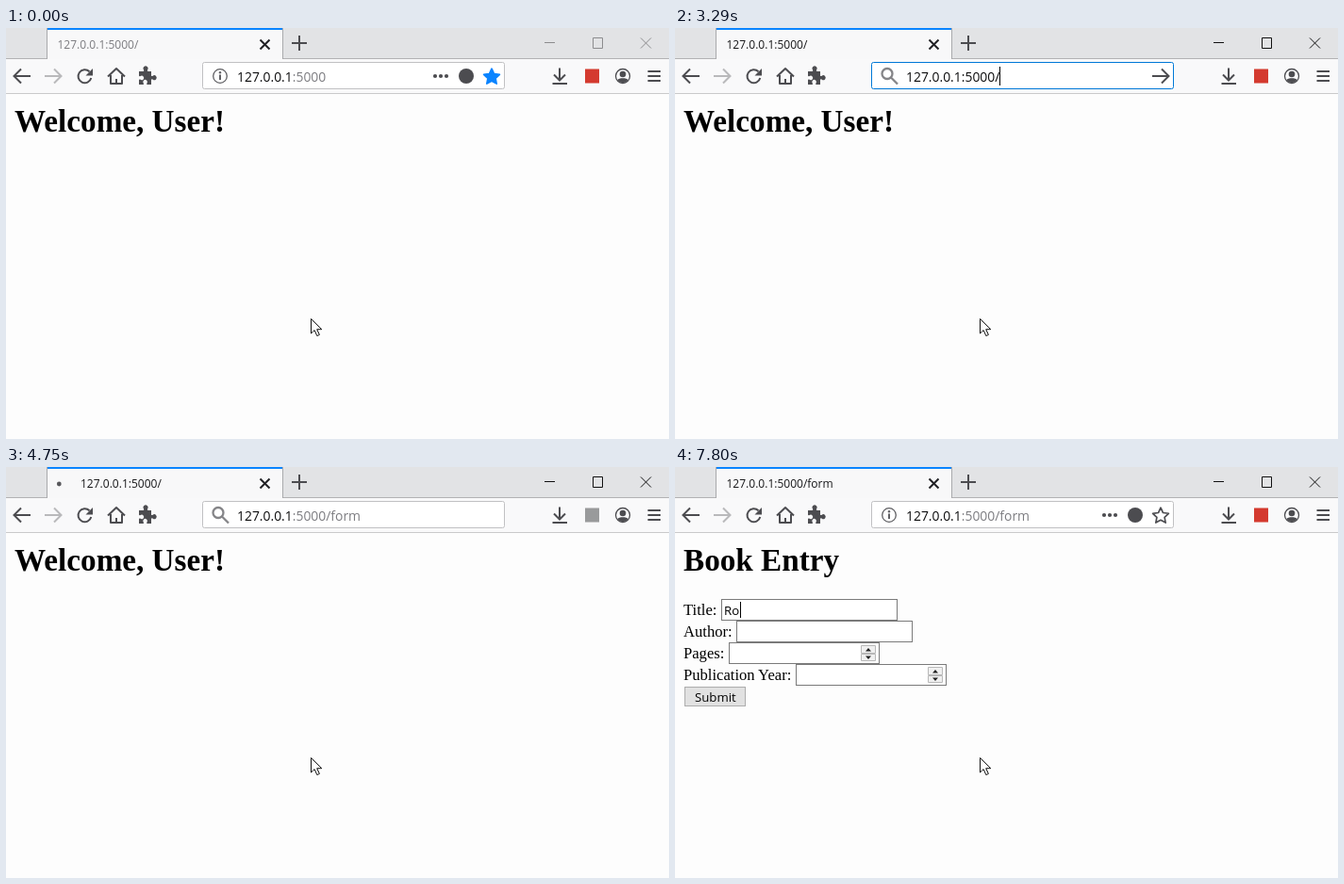
Write an HTML page that moves like this. It is 703x436 px and loops after 8 s.

```html
<!DOCTYPE html>
<html lang="en">
<head>
<meta charset="utf-8">
<title>Book Entry</title>
<style>
html, body { margin: 0; width: 100%; height: 100%; overflow: hidden; background: #fdfdfd; }
svg { display: block; width: 703px; height: 436px; }
text { font-family: "Open Sans", "Noto Sans", sans-serif; white-space: pre; }
.page text { font-family: "Liberation Serif", serif; font-size: 16.6px; }
.page text.head { font-size: 33.2px; font-weight: bold; }
.page text.ui { font-family: "Open Sans", "Noto Sans", sans-serif; font-size: 13.2px; }
.line { fill: none; stroke: #4c4c50; stroke-width: 2; }
.box { fill: #fff; stroke: #7a7a7a; }
.px { shape-rendering: crispEdges; }
</style>
</head>
<body>
<svg viewBox="0 0 703 436">
  <rect width="703" height="436" fill="#fdfdfd"/>

  <g class="page" id="welcome"><text class="head" x="9" y="110">Welcome, User!</text></g>

  <g class="page" id="form">
    <text class="head" x="9" y="110">Book Entry</text>
    <text x="9" y="157">Title:</text>
    <text x="9" y="180">Author:</text>
    <text x="9" y="203">Pages:</text>
    <text x="9" y="226">Publication Year:</text>
    <rect class="box" id="titleBox" x="49.5" y="140.5" width="186" height="22"/>
    <rect class="box" x="65.5" y="163.5" width="186" height="22"/>
    <rect class="box" x="57.5" y="186.5" width="159" height="22"/>
    <rect class="box" x="128.5" y="209.5" width="159" height="22"/>
    <g id="spin">
      <path d="M197.500 189.500h15v8h-15zM197.500 198.500h15v7h-15z" fill="#f0f0f0" stroke="#b8b8b8"/>
      <path d="M202 195.500l3-3.500 3 3.500zM202 200.500l3 3.500 3-3.500z" fill="#222"/>
    </g>
    <use href="#spin" x="71" y="23"/>
    <rect x="10.500" y="233.500" width="64" height="20" fill="#e1e1e1" stroke="#adadad"/>
    <text class="ui" x="21" y="249">Submit</text>
    <text class="ui" id="titleText" x="52" y="157"></text>
    <rect class="px" id="titleCaret" y="143" width="1" height="17"/>
  </g>

  <!-- tab strip -->
  <rect width="703" height="33" fill="#e2e3e5"/>
  <rect y="32" width="703" height="1" fill="#b2b2b4"/>
  <rect x="43" width="251" height="33" fill="#a9aaac"/>
  <rect x="44" y="0" width="249" height="33" fill="#f8f8f9"/>
  <rect x="44" y="0" width="249" height="2" fill="#0a84ff"/>
  <circle id="dot" cy="18" r="2.400" fill="#58585c"/>
  <text id="tabText" y="22" font-size="12"></text>
  <path class="line" d="M269.500 12.500l10 10m0-10l-10 10" style="stroke:#222226"/>
  <path class="line" d="M303 16h16M311 8v16"/>
  <path id="win" class="line" style="stroke-width:1" d="M571 15.500h11M622.500 10.500h10v11h-10zM673 10.500l11 11m0-11l-11 11"/>

  <!-- toolbar -->
  <rect y="33" width="703" height="36" fill="#f9f9fa"/>
  <rect y="69" width="703" height="1" fill="#c9c9cb"/>
  <path class="line" id="back" d="M26 51H9M16 43.500L8.500 51l7.500 7.500"/>
  <path class="line" d="M41 51h17M51 43.500l7.500 7.500-7.500 7.500" style="stroke:#b9b9bb"/>
  <path class="line" d="M88.500 46.300A7 7 0 1 0 90.300 53"/>
  <path d="M92 43v7.500h-7.500z" fill="#4c4c50"/>
  <path class="line" d="M108 51.500l9-8.500 9 8.500M111 50v9h12v-9M117 59v-5" stroke-linejoin="round"/>
  <path d="M141 46h4.500c1 0 .8-1 .4-1.700a2.600 2.600 0 1 1 4.300 0c-.4.700-.6 1.700.4 1.700H154v4.200c0 1 1 1 1.700.5a2.500 2.500 0 1 1 0 4c-.7-.5-1.700-.5-1.700.5V60h-4c-1 0-.9-.9-.5-1.600a2.300 2.300 0 1 0-3.800 0c.4.700.5 1.600-.5 1.600H141v-4.800c0-1 1-.8 1.600-.4a2.300 2.300 0 1 0 0-3.800c-.6.400-1.600.6-1.600-.4z" fill="#4c4c50"/>

  <rect id="bar" x="208.500" y="36.500" width="320" height="28" rx="2" fill="#fff"/>
  <g id="info" fill="#606064">
    <circle cx="227" cy="51" r="7.300" fill="none" stroke="#606064" stroke-width="1.300"/>
    <rect x="226" y="49.500" width="2" height="5.500"/><circle cx="227" cy="47.300" r="1.200"/>
  </g>
  <path id="lens" class="line" style="stroke:#858588;stroke-width:2.300" d="M230.500 48.500a5.500 5.500 0 1 1-11 0a5.500 5.500 0 1 1 11 0M229 52.500l7 7"/>
  <rect id="select" class="px" x="245" y="41" width="94" height="20" fill="#0078d7"/>
  <text id="url" x="245" y="56.500" font-size="13.900"><tspan id="host">127.0.0.1</tspan><tspan id="path"></tspan></text>
  <rect id="caret" class="px" y="41" width="1" height="20"/>
  <path id="chevron" class="line" d="M427.500 48l6.300 6.300 6.300-6.300"/>
  <g id="actions">
    <g fill="#4c4c50">
      <circle cx="455" cy="51" r="2.100"/><circle cx="461" cy="51" r="2.100"/><circle cx="467" cy="51" r="2.100"/>
      <circle cx="488" cy="51" r="8"/>
    </g>
    <path id="star" stroke-width="1.700" stroke-linejoin="round"/>
  </g>
  <path id="go" class="line" d="M506 51h17M516 43.500l7.500 7.500-7.500 7.500"/>

  <path class="line" d="M587 42.500V55M581 49.500l6 6 6-6M579.500 59h15.500"/>
  <rect id="badge" x="614" y="43.500" width="15" height="15"/>
  <g fill="#4c4c50">
    <circle cx="654" cy="51" r="7.500" fill="none" stroke="#4c4c50" stroke-width="1.300"/>
    <circle cx="654" cy="49" r="3.300"/><path d="M648.500 55c1-2.500 10-2.500 11 0q-2 3-5.500 3t-5.500-3"/>
  </g>
  <path class="line" d="M680.500 46H694M680.500 51H694M680.500 56H694"/>

  <!-- suggestions -->
  <g id="popup">
    <rect y="70" width="703" height="42" fill="#fafafa"/>
    <rect x="4" y="74" width="695" height="34" rx="2" fill="#0078d7"/>
    <rect y="112" width="703" height="67" fill="#ebebeb"/>
    <path class="px" d="M0 112.500h703M0 141.500h703" stroke="#cccccd"/>
    <rect x="7" y="179" width="696" height="1" fill="#858586"/>
    <rect x="8" y="180" width="695" height="1" fill="#a6a6a7"/>
    <rect x="9" y="181" width="694" height="1" fill="#e0e0e0"/>
    <path fill="none" stroke="#fff" stroke-width="1.400" d="M235.300 92a8.300 8.300 0 1 1-16.600 0a8.300 8.300 0 1 1 16.600 0M231 92a4 8.300 0 1 1-8 0a4 8.300 0 1 1 8 0M219.500 89h15M219.500 95h15"/>
    <text x="245" y="97" font-size="13.900" fill="#fff">http://<tspan id="hint" font-weight="600"></tspan><tspan dx="6">—</tspan><tspan dx="7" font-size="12.400" y="97.500">Visit</tspan></text>
    <text x="7" y="133" font-size="12.100" fill="#7b7b7d">Search for<tspan id="query" x="71" fill="#111"></tspan> with:</text>
    <path class="px" d="M57.500 147v26M115.500 147v26M172.500 147v26M230.500 147v26M288.500 147v26M643.500 147v26" stroke="#c4c4c5"/>
    <circle cx="29" cy="160" r="8" fill="#4285f4"/>
    <rect x="78" y="151" width="18" height="18" fill="#0c8484"/>
    <rect x="137" y="152" width="16" height="16" fill="#111"/>
    <circle cx="202" cy="160" r="9" fill="#de5833"/>
    <circle cx="260" cy="160" r="8" fill="#1da1f2"/>
    <rect x="310" y="152" width="16" height="16" fill="#222"/>
    <circle cx="673" cy="160" r="5" fill="none" stroke="#737375" stroke-width="2"/>
    <path id="gear" stroke="#737375" stroke-width="2.300"/>
  </g>

  <path d="M323.500 308.500v15.500l3.600-3.400 2.700 6 2.600-1.200-2.700-5.700h5.100z" fill="#fff" stroke="#111"/>
</svg>
<script>
const LOOP = 8000;
const $ = id => document.getElementById(id);
const show = (id, on) => $(id).setAttribute("display", on ? "inline" : "none");
const set = (id, name, value) => $(id).setAttribute(name, value);
const write = (id, s) => { if ($(id).textContent !== s) $(id).textContent = s; };

// value of the last [time, value] step reached
const step = (t, steps) => steps.reduce((v, s) => t >= s[0] ? s[1] : v, steps[0][1]);
const polar = (cx, cy, r, a) => (cx + r * Math.cos(a)).toFixed(2) + " " + (cy + r * Math.sin(a)).toFixed(2);

set("star", "d", "M" + Array.from({ length: 10 }, (_, i) =>
  polar(515, 52, i % 2 ? 4.3 : 8.8, (i / 5 - 0.5) * Math.PI)).join("L") + "Z");
set("gear", "d", Array.from({ length: 8 }, (_, i) =>
  "M" + polar(673, 160, 5, i * Math.PI / 4) + "L" + polar(673, 160, 8.7, i * Math.PI / 4)).join(""));

function draw(t) {
  const focus = t >= 1750 && t < 4750;
  const selected = focus && t < 2420;
  const typing = t >= 3290 && t < 4750;
  const loading = t >= 4750 && t < 4930;
  const loaded = t >= 4870;
  const ready = t >= 4980;

  // window and tab
  set("win", "d", $("win").getAttribute("d"));
  $("win").style.stroke = t < 1310 ? "#8c8c8e" : "#111";
  set("tabText", "fill", t < 1310 ? "#7c7c80" : "#18181a");
  set("tabText", "x", loading ? 79 : 54.5);
  write("tabText", "127.0.0.1:5000/" + (t >= 4930 ? "form" : ""));
  show("dot", loading);
  set("dot", "cx", step(t, [[0, 56.3], [4810, 62], [4870, 67]]));

  // address bar
  const typed = step(t, [[0, ""], [3290, "/"], [3840, "/f"], [4030, "/fo"],
    [4260, "/for"], [4390, "/form"]]);
  set("bar", "stroke", focus ? "#0078d7" : "#c1c1c3");
  write("path", ":5000" + typed);
  set("host", "fill", selected ? "#fff" : "#0c0c0d");
  set("path", "fill", selected ? "#fff" : focus ? "#0c0c0d" : "#7c7c80");
  show("select", selected);
  show("caret", focus && !selected && !(t >= 2790 && t < 3290));
  set("caret", "x", Math.round(245 + $("url").getComputedTextLength()));
  show("chevron", focus && !typing);
  set("chevron", "opacity", step(t, [[0, 0.3], [1800, 0.65], [1860, 1]]));
  const search = t >= 3290 && !loaded;
  show("lens", search);
  show("info", !search);
  show("go", typing);
  show("actions", t < 3290 || ready);
  set("star", "fill", ready ? "none" : "#0a84ff");
  set("star", "stroke", ready ? "#4c4c50" : "#0a84ff");
  set("badge", "fill", t >= 4750 && t < 5040 ? "#999a9b" : "#d43a2f");

  // suggestions lag a little behind the typing
  const hint = "127.0.0.1:5000" + step(t, [[0, "/"], [3890, "/f"], [4080, "/fo"],
    [4260, "/for"], [4440, "/form"]]);
  show("popup", t >= 3340 && t < 4750);
  write("hint", hint);
  write("query", hint);

  // page
  show("welcome", !loaded);
  show("form", loaded);
  const title = step(t, [[0, ""], [7560, "R"], [7800, "Ro"]]);
  set("titleBox", "stroke", t >= 6010 ? "#0078d7" : "#7a7a7a");
  write("titleText", title);
  show("titleCaret", t >= 6010 && !(t >= 6510 && t < 7000));
  set("titleCaret", "x", step(t, [[0, 52], [7560, 61], [7800, 69]]));
}

function tick() {
  draw(performance.now() % LOOP);
  requestAnimationFrame(tick);
}
tick();
</script>
</body>
</html>
```
